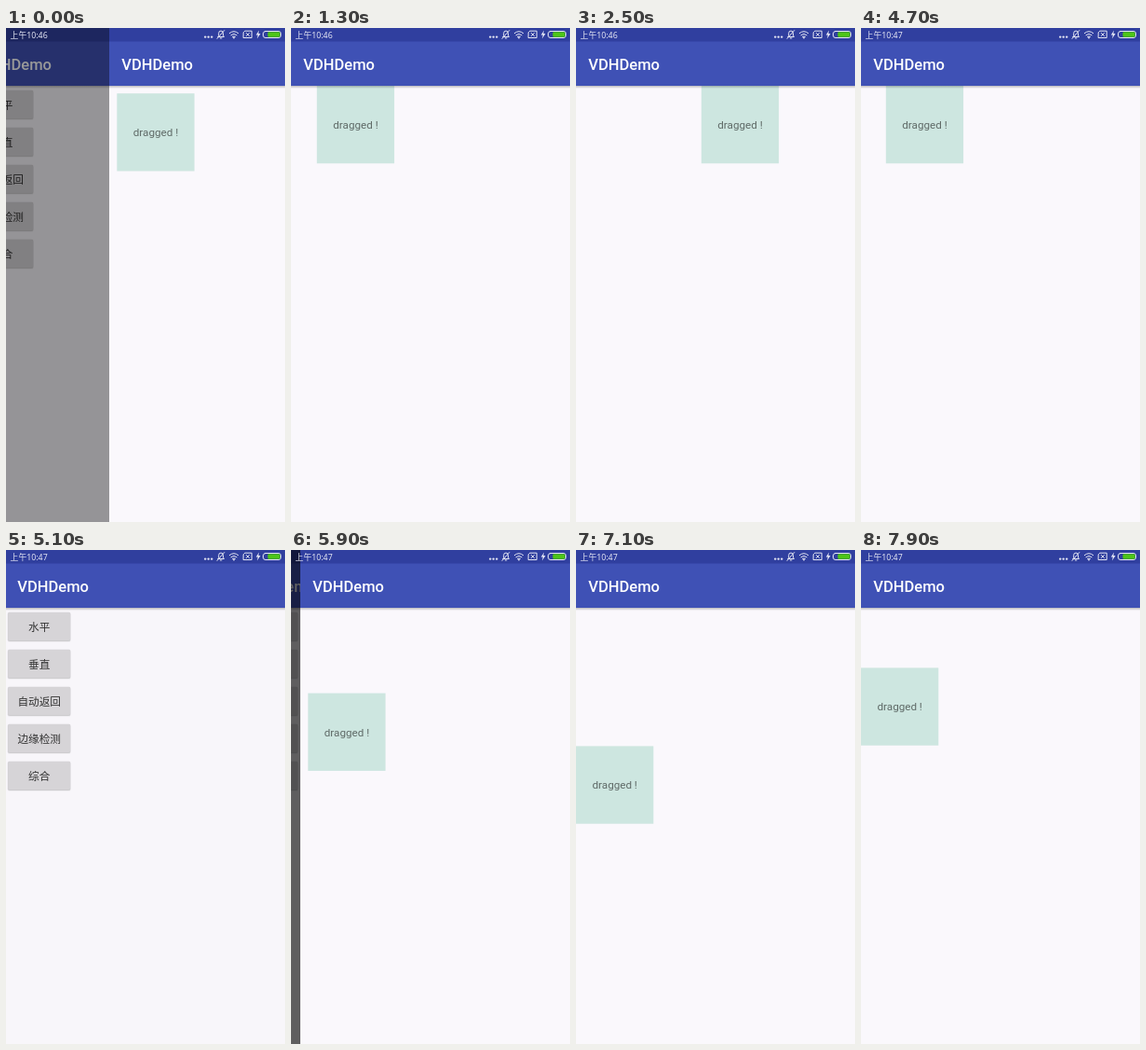
An HTML page that plays this animation: 300x530 px, repeating every 8000 ms.

```html
<!DOCTYPE html>
<html lang="zh">
<head>
<meta charset="utf-8">
<title>VDHDemo</title>
<style>
  html, body { margin: 0; width: 100%; height: 100%; overflow: hidden; background: #faf8fc; }
  svg { display: block; width: 100%; height: 100%; }
  text { font-family: Roboto, "Noto Sans CJK SC", "Noto Sans CJK", sans-serif; }
  .title { font-size: 16.55px; font-weight: 500; fill: #fff; }
  .label { font-size: 11.67px; text-anchor: middle; }
  .icons { fill: none; stroke: #e3e5f3; stroke-width: 1; stroke-linecap: round; stroke-linejoin: round; }
  .solid { fill: #e3e5f3; stroke: none; }
  #clock { font: 8.8px "Noto Sans", "Noto Sans CJK SC", "Noto Sans CJK", sans-serif; }
</style>
</head>
<body>
<svg viewBox="0 0 300 530">
  <defs>
    <linearGradient id="fade" x2="0" y2="1">
      <stop offset="0" stop-opacity=".25"/>
      <stop offset="1" stop-opacity="0"/>
    </linearGradient>
    <g id="header">
      <rect y="62" width="350" height="3" fill="url(#fade)"/>
      <rect width="350" height="62" fill="#3f51b5"/>
      <rect width="350" height="14.5" fill="#303f9f"/>
      <text class="title" x="13.3" y="45">VDHDemo</text>
    </g>
  </defs>

  <g id="list">
    <rect width="350" height="530" fill="#faf8fc"/>
    <g id="buttons"></g>
    <use href="#header"/>
    <rect id="dim" width="350" height="530"/>
  </g>

  <g id="page">
    <rect width="300" height="530" fill="#faf8fc"/>
    <g id="box">
      <rect width="83.3" height="83.3" fill="#cde6e0"/>
      <text class="label" x="41.7" y="46" fill="#5f6a67">dragged !</text>
    </g>
    <use href="#header"/>
  </g>

  <g class="icons">
    <text id="clock" class="solid" x="4.6" y="10.6"></text>
    <g class="solid">
      <circle cx="214.2" cy="9.6" r="1.2"/>
      <circle cx="217.7" cy="9.6" r="1.2"/>
      <circle cx="221.2" cy="9.6" r="1.2"/>
    </g>
    <path d="M228 9.5h6.5l-1-1.5V5.5a2.4 2.4 0 0 0-4.8 0V8zM230.3 11h1.6M227 11.5l7.8-9"/>
    <path d="M240.3 5.6q4.7-4 9.4 0M241.9 7.6q3.1-2.6 6.2 0M243.5 9.4q1.5-1.2 3 0"/>
    <circle class="solid" cx="245" cy="10.5" r=".9"/>
    <path d="M255.5 4.5l1.3-1.3h7.4v7.3h-8.7zM258.3 5.4l3.2 3.2M261.5 5.4l-3.2 3.2"/>
    <path class="solid" d="M272 2.5l-3.2 5h2l-.8 4 3.6-5.4h-2.2z"/>
    <rect x="276.5" y="3.5" width="19" height="7" rx="2.5"/>
    <rect x="281.5" y="4.3" width="13.2" height="5.4" rx="1.2" fill="#4cc417" stroke="none"/>
  </g>
</svg>

<script>
const LOOP = 8000, STEP = 100, WIDTH = 300;
const CLOSE = 4700, REOPEN = 5550, GRAB_X = 1300, GRAB_Y = 6600;
const $ = id => document.getElementById(id);

// Smooth 0 to 1 between two times.
function glide(t, start, end) {
  const u = Math.min(1, Math.max(0, (t - start) / (end - start)));
  return u * u * (3 - 2 * u);
}

const slideIn = elapsed => 1 - Math.exp(-elapsed / 100);
const slideOut = elapsed => Math.exp(-((elapsed / 195) ** 2));

// How far the detail page covers the list, 0 to 1.
function coverage(t) {
  if (t < CLOSE) return slideIn(t + 100);
  return t < REOPEN ? slideOut(t - CLOSE) : slideIn(t - REOPEN);
}

function horizontalDrag(t) {
  if (t < GRAB_X) return [8.3, 70.2];
  const x = 27.8 + 140 * glide(t, GRAB_X, 2100) - 39 * glide(t, 2100, 2400)
    + 6 * glide(t, 2400, 2500) - 108 * glide(t, 2700, 3000);
  return [x, 62];
}

function verticalDrag(t) {
  if (t < GRAB_Y) return [8.3, 153.6];
  const y = 177.4 + 152 * glide(t, GRAB_Y, 6900) - 238 * glide(t, 6900, 7300)
    + 31 * glide(t, 7300, 7400) + 4 * glide(t, 7700, 7900);
  return [0, y];
}

function move(id, x, y = 0) {
  $(id).setAttribute("transform", `translate(${x} ${y})`);
}

function draw(t) {
  const covered = coverage(t);
  move("list", Math.round(-65 * covered));
  $("dim").setAttribute("opacity", .64 * covered);
  move("page", covered < .02 ? WIDTH : Math.round(WIDTH * (1 - covered)) + 1 - Math.ceil(covered - .99));
  move("box", ...(t < REOPEN ? horizontalDrag(t) : verticalDrag(t)));
  $("clock").textContent = t < 3500 ? "上午10:46" : "上午10:47";
}

$("buttons").innerHTML = ["水平", "垂直", "自动返回", "边缘检测", "综合"].map((name, i) => `
  <g transform="translate(0 ${40 * i})">
    <rect x="2.6" y="66.6" width="68.1" height="32" rx="2.2" opacity=".08"/>
    <rect x="3" y="67" width="67.3" height="31" rx="2" opacity=".1"/>
    <rect x="3.3" y="67" width="66.7" height="30" rx="1.7" fill="#d8d6d9"/>
    <text class="label" x="36.7" y="86.5" fill="#333">${name}</text>
  </g>`).join("");

function tick() {
  draw(Math.floor(performance.now() % LOOP / STEP) * STEP);
  requestAnimationFrame(tick);
}
tick();
</script>
</body>
</html>
```
